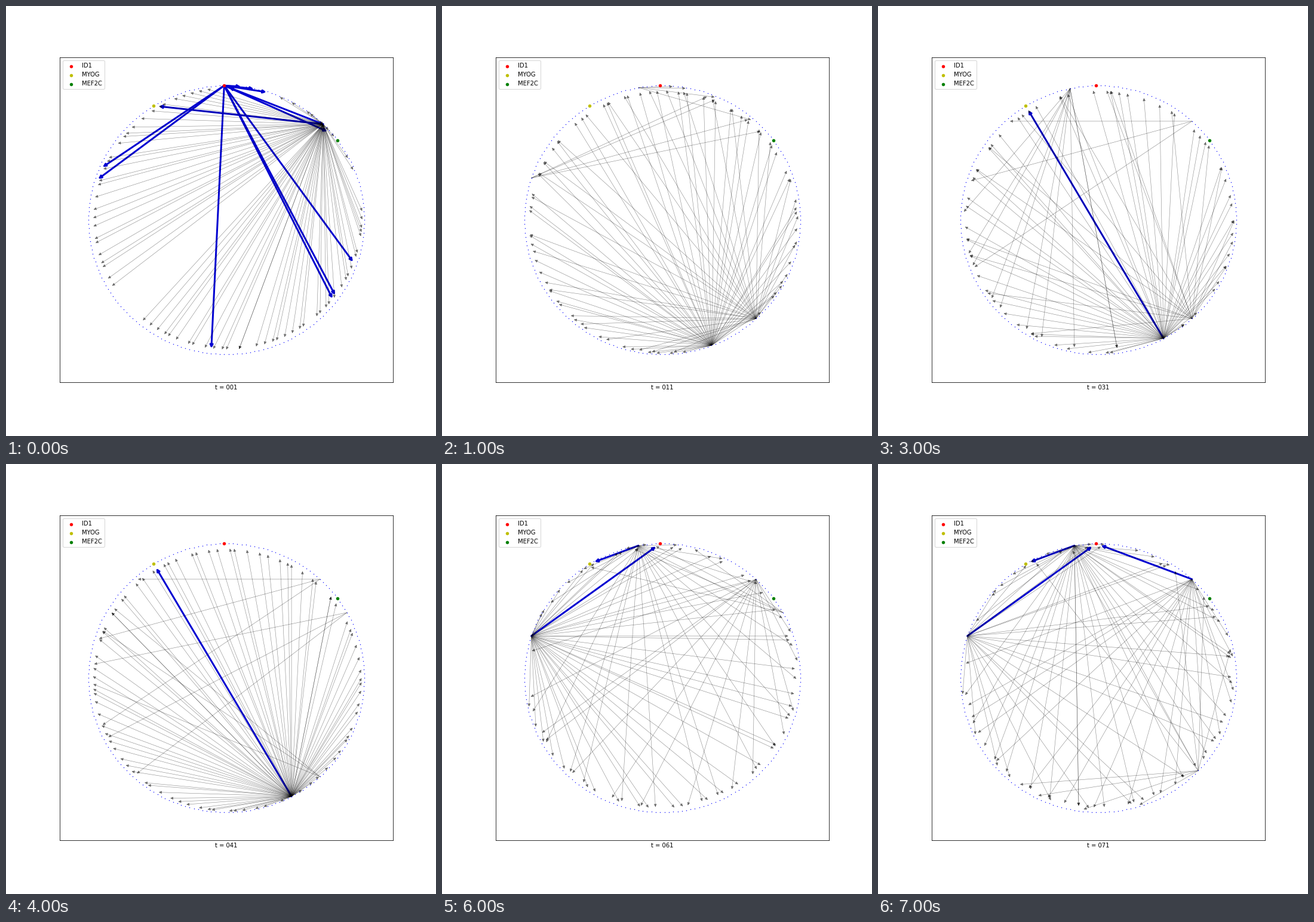
A matplotlib script for the animation above (8 s loop, 720 by 720 pixels).

```python
import random

import matplotlib.pyplot as plt
import numpy as np
from matplotlib.animation import FuncAnimation
from matplotlib.patches import FancyArrowPatch

N = 198
ID1, MYOG, MEF2C = 50, 67, 20
GENES = [("ID1", ID1, "r"), ("MYOG", MYOG, "y"), ("MEF2C", MEF2C, "g")]

# Regulator nodes, counted anticlockwise from the right.
EAST, NORTH_EAST, NORTH, WEST = 16, 26, 55, 89
SOUTH, SOUTH_EAST = 164, 172

angle = 2 * np.pi * np.arange(N) / N
pos = np.column_stack([np.cos(angle), np.sin(angle)])


def fan(hub, count, start, stop):
    """Edges from hub to count nodes scattered evenly over an arc."""
    rng = random.Random(hub * N + count)
    gap = (stop - start) / count
    ends = [int(start + (i + rng.random()) * gap) % N for i in range(count)]
    return [(hub, end) for end in ends if end != hub]


# Arcs that pass the right-hand node run on beyond N.
thin = [
    fan(25, 29, 54, 118) + fan(25, 38, 126, 201) + fan(25, 9, 10, 42),
    fan(160, 51, 174, 354) + fan(SOUTH_EAST, 30, 180, 354)
    + fan(WEST, 4, 22, 43) + fan(NORTH, 4, 22, 53),
    fan(166, 40, 170, 350) + fan(SOUTH_EAST, 21, 177, 327)
    + fan(56, 14, 97, 131) + fan(56, 11, 150, 237)
    + fan(192, 6, 4, 83) + fan(EAST, 2, 84, 129),
    fan(SOUTH, 50, 168, 352) + fan(SOUTH_EAST, 16, 180, 330)
    + fan(56, 10, 97, 160) + fan(NORTH_EAST, 3, 40, 146),
    fan(SOUTH, 80, 168, 359) + fan(SOUTH_EAST, 3, 78, 105)
    + fan(NORTH_EAST, 3, 40, 146) + fan(EAST, 3, 91, 130),
    fan(WEST, 58, 111, 285) + fan(NORTH, 8, 103, 144)
    + fan(NORTH, 9, 168, 286) + fan(83, 5, 92, 215)
    + fan(EAST, 6, 38, 69),
    fan(WEST, 40, 105, 284) + fan(NORTH, 22, 102, 286)
    + fan(NORTH_EAST, 14, 90, 210) + fan(EAST, 4, 38, 69),
    fan(WEST, 22, 103, 279) + fan(NORTH, 35, 102, 288)
    + fan(NORTH_EAST, 18, 93, 214) + fan(174, 4, 119, 162)
    + fan(174, 5, 4, 72),
]

# Bold edges touch the highlighted genes.
bold = [
    [(25, MYOG), (25, ID1)]
    + [(ID1, j) for j in (22, 39, 42, 45, 87, 90, 145, 177, 178, 187)],
    [],
    [(166, ID1), (166, MEF2C)],
    [(SOUTH, MYOG)],
    [(SOUTH, MYOG)],
    [(WEST, MYOG), (WEST, ID1), (NORTH, ID1)],
    [(WEST, ID1), (NORTH, MYOG)],
    [(NORTH, MYOG), (WEST, ID1), (NORTH_EAST, ID1)],
]

fig, ax = plt.subplots(figsize=(10, 10), dpi=72)
fig.subplots_adjust(left=0.125, right=0.9, bottom=0.125, top=0.88)
ax.set(xlim=(-1.208, 1.208), ylim=(-1.208, 1.208), xticks=[], yticks=[])
ax.scatter(*pos.T, s=1, c="b", linewidths=0.4, zorder=2)
for name, node, color in GENES:
    ax.scatter(*pos[node], s=20, c=color, label=name, zorder=3)
ax.legend(loc="upper left", fontsize=10)
label = ax.set_xlabel("", fontsize=10)
arrows = []


def add_arrow(a, b, color, width, zorder):
    arrow = FancyArrowPatch(pos[a], pos[b], arrowstyle="-|>", shrinkA=0,
                            shrinkB=np.sqrt(300) / 2, mutation_scale=10,
                            color=color, linewidth=width, zorder=zorder)
    arrows.append(ax.add_patch(arrow))


def draw(k):
    while arrows:
        arrows.pop().remove()
    for a, b in bold[k]:
        add_arrow(a, b, (0, 0, 0.82), 3, 1)
    for a, b in thin[k]:
        add_arrow(a, b, (0, 0, 0, 0.45), 0.6, 1.5)
    label.set_text(f"t = {10 * k + 1:03d}")
    return arrows + [label]


anim = FuncAnimation(fig, draw, frames=len(thin), interval=1000,
                     init_func=lambda: draw(0), repeat=True, repeat_delay=0)
plt.show()
```
